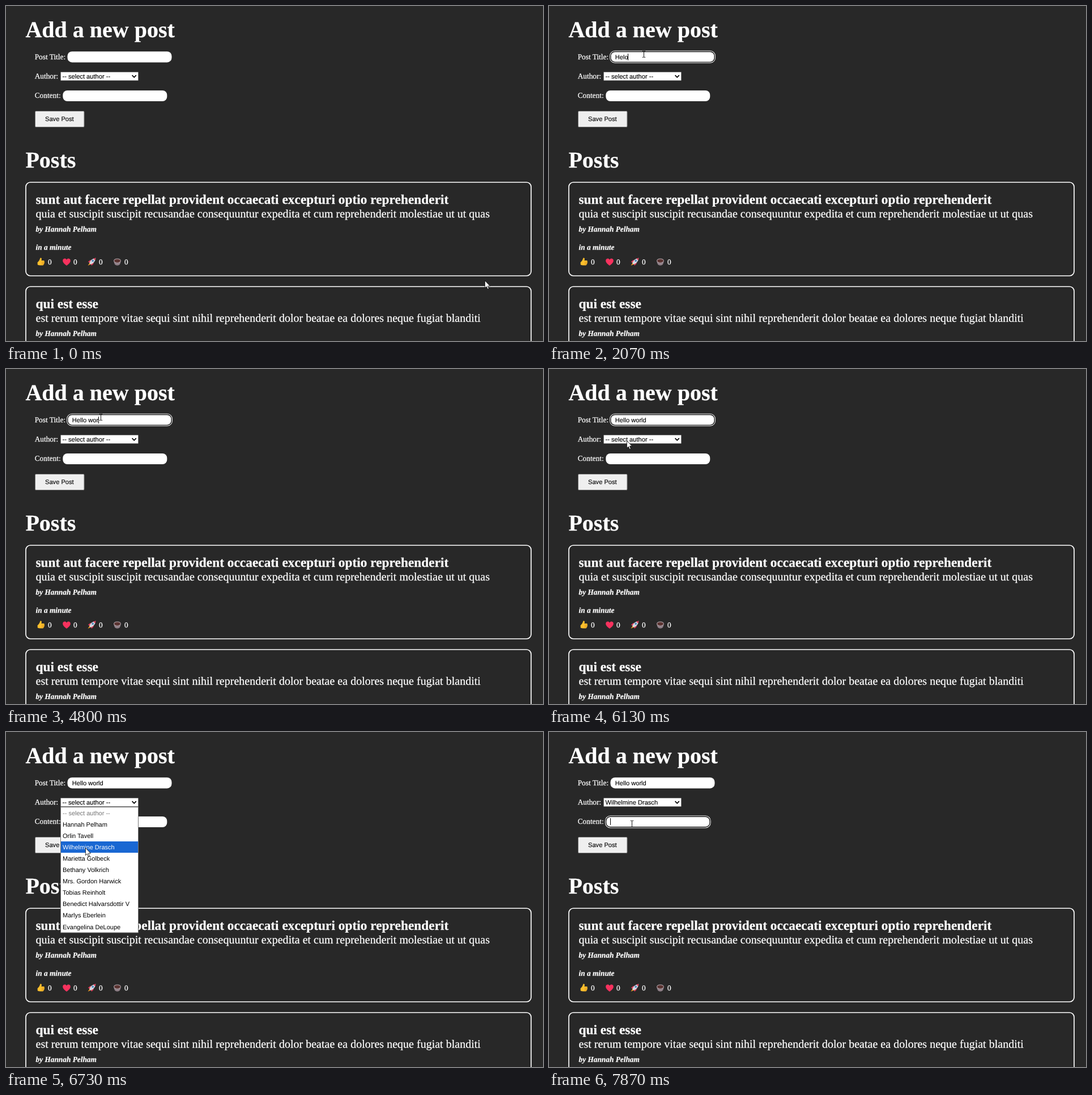
Write an HTML page that moves like this. It is 948 by 591 pixels and loops after 8 s.

```html
<!DOCTYPE html>
<html lang="en">
<head>
<meta charset="utf-8">
<title>Add a new post</title>
<style>
  html, body { margin: 0; width: 100%; height: 100%; overflow: hidden; background: #282828; }
  svg { display: block; width: 948px; height: 591px; }
  text { white-space: pre; text-rendering: geometricPrecision; }
  .serif { font-family: "Liberation Serif", "Times New Roman", serif; fill: #fff; stroke: #fff; stroke-width: .25px; }
  .sans { font-family: "Liberation Sans", Arial, sans-serif; font-size: 11.11px; fill: #000; stroke: #000; stroke-width: .12px; }
  .h1 { font-size: 40px; font-weight: bold; }
  .h2 { font-size: 23.38px; font-weight: bold; }
  .body { font-size: 20.05px; }
  .small { font-size: 13.33px; }
  .byline { font-size: 13.33px; font-weight: bold; font-style: italic; }
  .option { font-size: 11px; stroke: none; }
</style>
</head>
<body>
<svg id="stage" viewBox="0 0 948 591">
  <rect width="948" height="591" fill="#282828"/>
  <g id="page"></g>

  <g id="reactions">
    <g transform="translate(55 444)">
      <path d="M.6 8.2Q3.5 6.3 5.2 1.2Q5.6-.2 7 .4Q8.6 1.3 7.4 5H11.7Q13.6 5.6 12.6 7.2Q13.7 8.4 12.4 9.5Q13 11 11.6 11.6Q11.6 13.4 9.8 13.5H5.4Q2.6 13.3.8 12.4Z" fill="#fdbf2d"/>
      <path d="M7.6 7.4H12.2M7.8 9.6H12M7.8 11.6H11.4" stroke="#d98c1b" stroke-width=".7" fill="none"/>
    </g>
    <path transform="translate(100 445)" d="M7 13C3.5 10.3.2 7.6.2 4.2C.2.2 5.2-.8 7 2.6C8.8-.8 13.8.2 13.8 4.2C13.8 7.6 10.5 10.3 7 13Z" fill="#f8325e"/>
    <g transform="translate(144 444)">
      <path d="M.8 7.6L4.4 4.2H9L4.4 9.2ZM7 14L10.6 10.4V6L5.6 10.6Z" fill="#e23b58"/>
      <path d="M3 9.8Q5 2.2 14.4.4Q13.2 9.2 5.2 12Z" fill="#d5d9e2"/>
      <path d="M10.2 1.6Q12.4.7 14.4.4Q14.2 2.8 13.2 4.8Z" fill="#e23b58"/>
      <circle cx="9.2" cy="5.4" r="1.8" fill="#4b83b8"/>
      <path d="M3.4 9.4L.6 14L5.4 11.6Z" fill="#f9a52b"/>
    </g>
    <g transform="translate(190 445)">
      <path d="M.3 4.4Q.8 12.8 6.5 12.8Q12.2 12.8 12.7 4.4Z" fill="#8f8088"/>
      <ellipse cx="6.5" cy="4.4" rx="6.3" ry="4" fill="#b9adb3"/>
      <ellipse cx="6.5" cy="4.6" rx="5.4" ry="3.2" fill="#5a3331"/>
    </g>
  </g>

  <g id="form"></g>

  <g id="menu">
    <rect x="96.5" y="132.5" width="137" height="221.5" fill="#fff" stroke="#767676"/>
    <rect id="highlight" x="97" width="136" height="20" fill="#1967d2"/>
  </g>

  <path id="arrow" d="M.4.4V13.6L3.3 10.9L5.3 15.6L7.4 14.7L5.4 10.1H9.5Z" fill="#fff" stroke="#000" stroke-width=".8"/>
  <path id="beam" d="M-2.5-5.5H-.7L0-4.8L.7-5.5H2.5M0-5V5M-2.5 5.5H-.7L0 4.8L.7 5.5H2.5" fill="none" stroke="#111"/>
</svg>
<script>
const LOOP = 8000, TICK = 1000 / 15;
const byId = id => document.getElementById(id);

function add(parent, tag, attrs, content = "") {
  const node = document.createElementNS("http://www.w3.org/2000/svg", tag);
  for (const key in attrs) node.setAttribute(key, attrs[key]);
  node.textContent = content;
  return parent.appendChild(node);
}
const write = (parent, x, y, cls, content) => add(parent, "text", { x, y, class: cls }, content);
const show = (node, on) => node.setAttribute("visibility", on ? "visible" : "hidden");

const PROMPT = "-- select author --";
const AUTHORS = [
  "Hannah Pelham", "Orlin Tavell", "Wilhelmine Drasch", "Marietta Golbeck", "Bethany Volkrich",
  "Mrs. Gordon Harwick", "Tobias Reinholt", "Benedict Halvarsdottir V", "Marlys Eberlein", "Evangelina DeLoupe"
];

// Static page
const page = byId("page"), form = byId("form"), menu = byId("menu");
write(page, 34.4, 55, "serif h1", "Add a new post");
write(page, 34.4, 285, "serif h1", "Posts");

function post(y, title, body) {
  add(page, "rect", { x: 35, y: y + 1, width: 892, height: 165, rx: 8, fill: "none", stroke: "#fff", "stroke-width": 1.67 });
  write(page, 52.5, y + 39.3, "serif h2", title);
  write(page, 52.5, y + 63.3, "serif body", body);
  write(page, 52.5, y + 88, "serif byline", "by " + AUTHORS[0]);
}
post(310, "sunt aut facere repellat provident occaecati excepturi optio reprehenderit",
  "quia et suscipit suscipit recusandae consequuntur expedita et cum reprehenderit molestiae ut ut quas");
post(494, "qui est esse",
  "est rerum tempore vitae sequi sint nihil reprehenderit dolor beatae ea dolores neque fugiat blanditi");
write(page, 52.5, 430, "serif byline", "in a minute");
for (let i = 0; i < 4; i++) write(page, 74 + 45 * i, 456, "serif small", "0");

// Form controls
["Post Title:", "Author:", "Content:"].forEach((label, i) => write(form, 50.7, 94 + 34.2 * i, "serif small", label));

function control(x, y, width, height, rx, border) {
  const box = (grow, fill) => ({
    x: x - grow, y: y - grow, width: width + 2 * grow, height: height + 2 * grow, rx: rx + grow, fill
  });
  add(form, "rect", { ...box(0, "#fff"), stroke: border });
  const ring = add(form, "g", {});
  add(ring, "rect", box(1.4, "#fff"));
  add(ring, "rect", box(.4, "#101010"));
  add(ring, "rect", box(-1, "#fff"));
  return ring;
}
const titleRing = control(108.5, 80.2, 184, 19.2, 8, "none");
const selectRing = control(96.5, 116.5, 137, 15, 1, "#767676");
const contentRing = control(100.3, 149, 184, 19, 8, "none");

const titleText = write(form, 116.8, 94, "sans", "");
const selectText = write(form, 99.5, 128, "sans", PROMPT);
add(form, "path", { d: "M222.6 122.2L226.2 125.8L229.8 122.2", fill: "none", stroke: "#000", "stroke-width": 1.7 });
const button = add(form, "rect", { x: 51.5, y: 185.5, width: 86.5, height: 28, rx: 1.5, stroke: "#767676" });
write(form, 69, 203, "sans", "Save Post");
const caret = add(form, "rect", { width: 1, height: 12, fill: "#000" });

const options = [PROMPT, ...AUTHORS].map((name, i) => write(menu, 100, 147 + 20.05 * i, "sans option", name));

// Typing: [time, text, caret visible]
const typing = [
  [0, "", false], [730, "", true], [1200, "", false], [1330, "H", true], [1530, "He", true],
  [1730, "Hel", true], [2070, "Helo", true], [2530, "Helo", false], [2600, "Hel", true],
  [2800, "Hell", true], [2930, "Hello", true], [3130, "Hello ", true], [3600, "Hello w", true],
  [3800, "Hello wo", true], [4330, "Hello wo", false], [4800, "Hello wor", true],
  [5000, "Hello worl", true], [5130, "Hello world", true], [5630, "Hello world", false]
];

// Pointer: [time, x, y]
const track = [
  [0, 845, 484], [10, 845, 484], [200, 640, 385], [400, 230, 215], [470, 134, 188], [600, 160, 98],
  [667, 167, 85], [5470, 167, 85], [5730, 148, 150], [5870, 132, 187], [6000, 134, 152],
  [6130, 137, 126], [6330, 137, 127], [6400, 139, 147], [6470, 141, 164], [6600, 141, 184],
  [6730, 140, 204], [6870, 140, 204], [7000, 132, 208], [7200, 140, 219], [7400, 142, 206],
  [7600, 145, 174], [7730, 146, 162], [LOOP, 146, 162]
];

function pointerAt(t) {
  const i = Math.max(1, track.findIndex(point => point[0] >= t));
  const [t0, x0, y0] = track[i - 1], [t1, x1, y1] = track[i];
  const k = (t - t0) / (t1 - t0);
  return [x0 + (x1 - x0) * k, y0 + (y1 - y0) * k];
}
const inside = (x, y, left, top, right, bottom) => x >= left && x <= right && y >= top && y <= bottom;

function render(t) {
  const [x, y] = pointerAt(t);
  const open = t >= 6330 && t < 6930;
  const titleFocus = t >= 730 && t < 6330;
  const contentFocus = t >= 7800;

  const [, text, caretOn] = typing.filter(step => step[0] <= t).pop();
  titleText.textContent = text;
  selectText.textContent = t < 6930 ? PROMPT : AUTHORS[2];
  show(titleRing, titleFocus);
  show(selectRing, t >= 6930 && !contentFocus);
  show(contentRing, contentFocus);

  show(caret, caretOn || contentFocus);
  const caretX = contentFocus ? 108.5 : 116.8 + (text ? titleText.getComputedTextLength() : 0);
  caret.setAttribute("x", Math.floor(caretX));
  caret.setAttribute("y", contentFocus ? 152 : 84);

  const hover = !open && inside(x, y, 51, 185, 138, 213);
  button.setAttribute("fill", hover ? "#e5e5e5" : "#efefef");

  menu.setAttribute("display", open ? "inline" : "none");
  const active = open ? Math.floor((y - 133) / 20) : 0;
  show(byId("highlight"), active > 0);
  byId("highlight").setAttribute("y", 133 + 20 * Math.max(0, active));
  options.forEach((node, i) => node.style.fill = i === 0 ? "#757575" : i === active ? "#fff" : "#000");

  const overInput = !open && (inside(x, y, 108, 80, 292, 99) || inside(x, y, 100, 149, 284, 168));
  show(byId("arrow"), !overInput);
  show(byId("beam"), overInput);
  byId("arrow").setAttribute("transform", `translate(${Math.round(x)} ${Math.round(y)})`);
  byId("beam").setAttribute("transform", `translate(${Math.round(x) + .5} ${Math.round(y)})`);
}

// The picture advances fifteen times a second, on times rounded to 10 ms.
const start = performance.now();
function frame() {
  const t = (performance.now() - start) % LOOP;
  const tick = Math.floor((t + 4) / TICK) * TICK;
  render(Math.round(tick / 10) * 10 % LOOP);
  requestAnimationFrame(frame);
}
frame();
</script>
</body>
</html>
```
